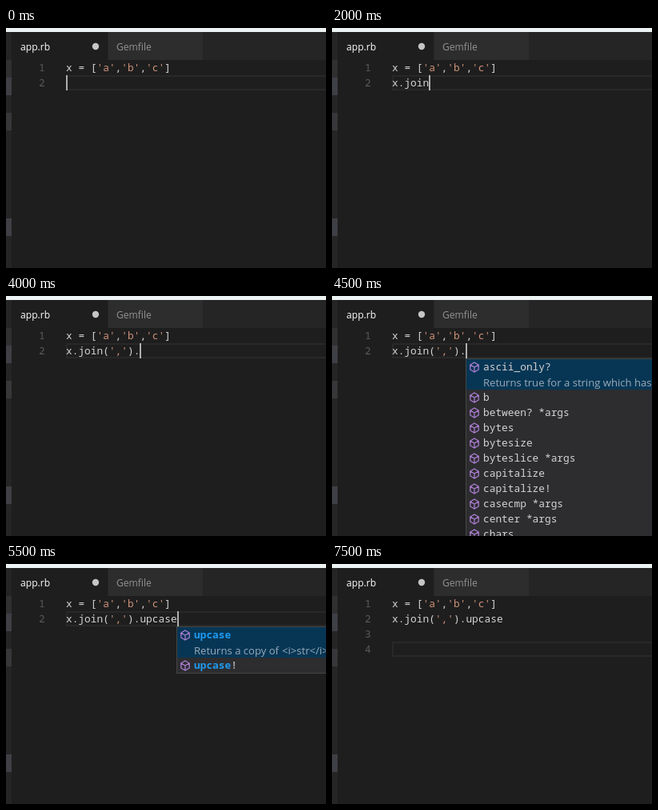
An HTML page with a canvas for the animation above (8 s loop, 400x300 px).

```html
<!DOCTYPE html>
<html lang="en">
<head>
<meta charset="utf-8">
<title>Code completion</title>
<style>
html, body { margin: 0; width: 400px; height: 300px; overflow: hidden; background: #1e1e1e; }
canvas { display: block; }
</style>
</head>
<body>
<canvas id="stage" width="400" height="300"></canvas>
<script>
const ctx = document.getElementById('stage').getContext('2d');
const MONO = '12.83px "Noto Sans Mono", "DejaVu Sans Mono", monospace';
const UI = '"Open Sans", "Noto Sans", sans-serif';
const CHAR = 7.7, ROW = 19, LEFT = 75, TOP = 40;
const STEP = 500, FIRST = "x = ['a','b','c']", LAST = "x.join(',').upcase";

const joinItem = { label: 'join *args', doc: [['Returns a string created by converting each element', 0]] };
const upcaseItem = { label: 'upcase', doc: [['Returns a copy of', 0], ['<i>str</i>', 110], ['wi', 179]] };
const item = label => ({ label });
const allItems = [
  { label: 'ascii_only?', doc: [['Returns true for a string which has only ASCII', 0]] },
  ...['b', 'between? *args', 'bytes', 'bytesize', 'byteslice *args', 'capitalize',
      'capitalize!', 'casecmp *args', 'center *args', 'chars', 'chomp *args'].map(item)
];

// One entry per step: code after the first line, caret column, optional popup
const steps = [
  { code: [''], col: 0 },
  { code: ['x.'], col: 2 },
  { code: ['x.jo'], col: 4, popup: { x: 104, match: 'jo', items: [joinItem] } },
  { code: ['x.join'], col: 6, popup: { x: 120, match: 'join', items: [joinItem] } },
  { code: ['x.join'], col: 6 },
  { code: ['x.join()'], col: 7 },
  { code: ["x.join('')"], col: 8 },
  { code: ["x.join(',')"], col: 9 },
  { code: ["x.join(',')."], col: 12 },
  { code: ["x.join(',')."], col: 12, popup: { x: 167, match: '', items: allItems } },
  { code: ["x.join(',').up"], col: 14, popup: { x: 183, match: 'up',
      items: [item('dup'), upcaseItem, item('upcase!'), item('upto *args')] } },
  { code: [LAST], col: 18, popup: { x: 213, match: 'upcase', items: [upcaseItem, item('upcase!')] } },
  { code: [LAST], col: 18 },
  { code: [LAST, ''], col: 0 },
  { code: [LAST, '', ''], col: 0 },
  { code: [LAST, '', ''], col: 0, hideCaret: true }
];

function rect(color, x, y, w, h) {
  ctx.fillStyle = color;
  ctx.fillRect(x, y, w, h);
}

function text(str, x, y, color, font = MONO) {
  ctx.font = font;
  ctx.fillStyle = color;
  ctx.fillText(str, x, y);
}

function drawWindow() {
  rect('#1e1e1e', 0, 0, 400, 300);
  rect('#252526', 0, 5, 7, 295);
  rect('#303031', 0, 40, 7, 22);
  rect('#3f3f46', 0, 62, 7, 22);
  rect('#37373a', 0, 106, 7, 22);
  rect('#3f3f46', 0, 238, 7, 22);
  rect('#252526', 127, 5, 273, 35);
  rect('#2d2d2d', 128, 5, 118, 35);
  rect('#edf2f2', 0, 0, 400, 5);
  text('app.rb', 18, 28, '#ffffff', '12.1px ' + UI);
  text('Gemfile', 138, 28, '#929292', '12.1px ' + UI);
  ctx.fillStyle = '#c5c5c5';
  ctx.beginPath();
  ctx.arc(112, 23, 4.2, 0, 7);
  ctx.fill();
}

function drawCode(str, row) {
  const y = TOP + row * ROW + 14;
  text(String(row + 1), 41, y, '#5a5a5a');
  let col = 0;
  for (const part of str.split(/('[^']*')/)) {
    text(part, LEFT + col * CHAR, y, part[0] === "'" ? '#ce9178' : '#d4d4d4');
    col += part.length;
  }
}

function drawCube(x, y) {
  ctx.strokeStyle = '#b180d7';
  ctx.lineWidth = 1.2;
  ctx.stroke(new Path2D(`M${x} ${y}m0-6l5.2 3v6l-5.2 3l-5.2-3v-6zm-5.2 3l5.2 3l5.2-3m-5.2 3v6`));
}

function drawPopup({ x, match, items }) {
  const height = items.reduce((sum, it) => sum + (it.doc ? 2 : 1) * ROW, 2);
  rect('#454545', x, 78, 432, height);
  rect('#2d2d30', x + 1, 79, 430, height - 2);
  let y = 79;
  for (const { label, doc } of items) {
    if (doc) rect('#073655', x + 1, y, 430, 2 * ROW);
    drawCube(x + 11, y + 10);
    const tx = x + 22, at = label.indexOf(match), end = at + match.length;
    text(label.slice(0, at), tx, y + 14, '#d4d4d4');
    text(match, tx + at * CHAR, y + 14, '#1e9bf0', 'bold ' + MONO);
    text(label.slice(end), tx + end * CHAR, y + 14, '#d4d4d4');
    y += ROW;
    if (doc) {
      for (const [str, dx] of doc) text(str, tx + dx, y + 15, '#9aabb9', '13.1px ' + UI);
      y += ROW;
    }
  }
}

function draw(now) {
  const { code, col, popup, hideCaret } = steps[Math.floor(now / STEP) % steps.length];
  const y = TOP + code.length * ROW;
  drawWindow();
  ctx.strokeStyle = '#282828';
  ctx.lineWidth = 2;
  ctx.strokeRect(LEFT + 1, y + 1, 400, ROW - 2);
  [FIRST, ...code].forEach(drawCode);
  if (popup) drawPopup(popup);
  if (!hideCaret) rect('#aeafad', Math.round(LEFT + col * CHAR), y, 2, ROW);
  requestAnimationFrame(draw);
}
requestAnimationFrame(draw);
</script>
</body>
</html>
```
